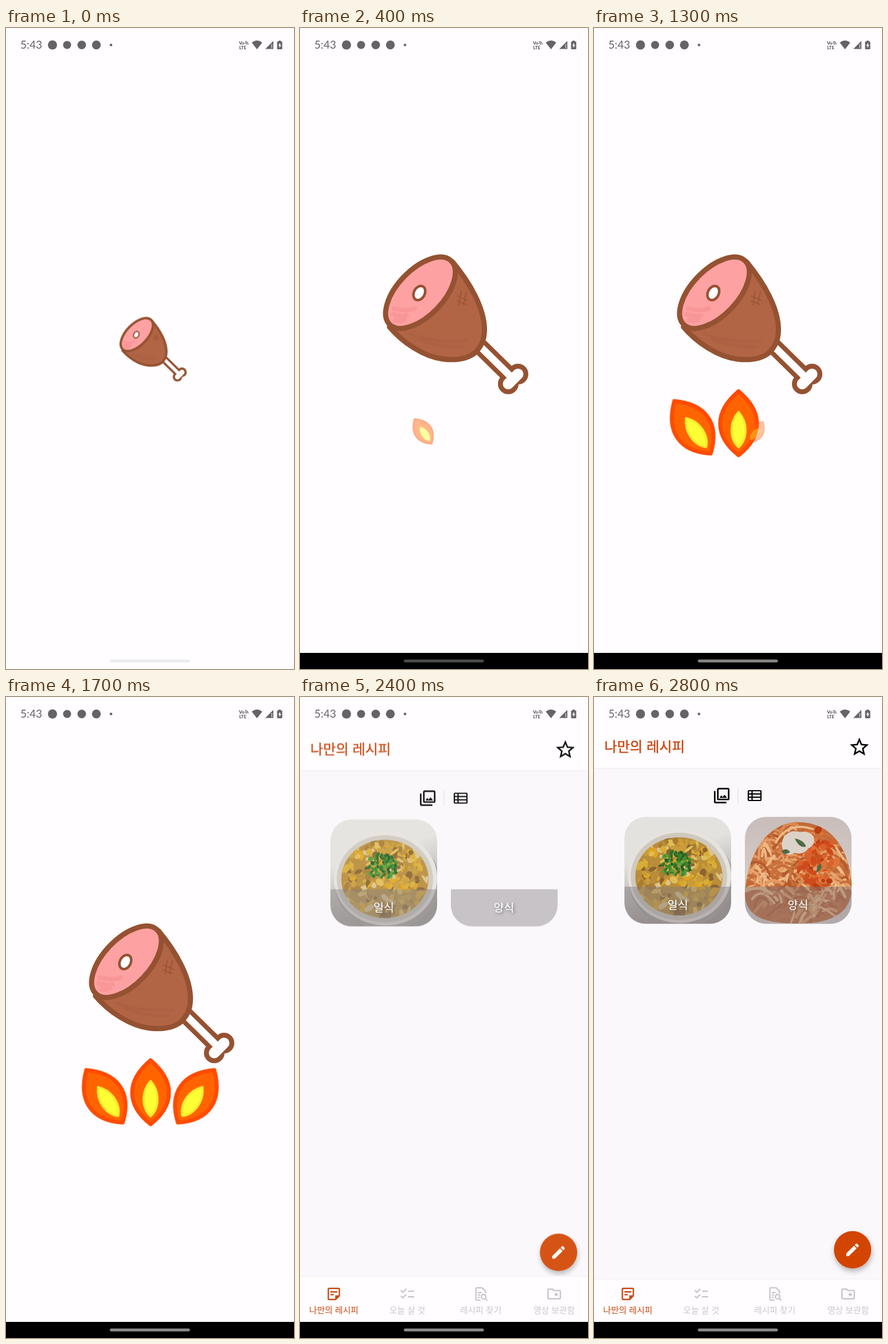
An HTML page that plays this animation: 502 px wide and 1115 px high, repeating every 3.6 s.

```html
<!DOCTYPE html>
<html lang="ko">
<head>
<meta charset="utf-8">
<title>Recipe app start</title>
<style>
html, body { margin: 0; width: 100%; height: 100%; overflow: hidden; background: #fffdff; }
svg { display: block; width: 100%; height: 100%; }
text { font-family: "Noto Sans CJK KR", "Noto Sans CJK", "Noto Sans", sans-serif; }
.status { fill: #666366; }
.status text { font-family: Lato, sans-serif; }
.mid { text-anchor: middle; }
.line { fill: none; stroke-linecap: round; stroke-linejoin: round; }

.splash, .scene, .bar, .pill, .home, .page, .tabs, .tabBack, .late, .flame {
  animation: 3.6s linear infinite both;
}
.splash { animation-name: splash; }
.scene { animation-name: scene; }
.bar { animation-name: bar; }
.pill { animation-name: pill; }
.home { animation-name: home; }
.page { animation-name: page; }
.tabs { animation-name: tabs; }
.tabBack { animation-name: tabBack; }
.late { animation-name: late; }
.flame { animation-name: grow; animation-delay: var(--at); transform-origin: 252px 708px; }

@keyframes splash { 0%, 2.2% { opacity: 1; } 5.3%, 100% { opacity: 0; } }
@keyframes scene { 0%, 2.2% { opacity: 0; } 5.3%, 54% { opacity: 1; } 58%, 100% { opacity: 0; } }
@keyframes bar { 0%, 2.2% { opacity: 0; } 5.3%, 100% { opacity: 1; } }
@keyframes pill {
  0%, 2.2% { fill: #ecebed; }
  5.3% { fill: #3c3c3c; }
  11.1% { fill: #4b4b4b; }
  25% { fill: #7b756f; }
  40%, 100% { fill: #8c8b8b; }
}
@keyframes home { 0%, 54% { opacity: 0; } 58%, 100% { opacity: 1; } }
@keyframes page {
  0%, 60.8% { opacity: 0; transform: translateY(45px); }
  63.9% { opacity: .7; transform: translateY(14px); }
  66.67% { opacity: .92; transform: translateY(4.5px); }
  70.8%, 100% { opacity: 1; transform: none; }
}
@keyframes tabs { 0%, 60.8% { opacity: 0; } 63.5%, 100% { opacity: 1; } }
@keyframes tabBack { 0%, 67% { transform: translateY(-5px); } 70.8%, 100% { transform: none; } }
@keyframes late { 0%, 69.2% { opacity: 0; } 69.3%, 100% { opacity: 1; } }
@keyframes grow {
  0% { transform: scale(0); opacity: 0; animation-timing-function: cubic-bezier(.4, 0, .2, 1); }
  12.8%, 60% { transform: none; opacity: 1; }
  60.1%, 100% { transform: scale(0); opacity: 0; }
}
</style>
</head>
<body>
<svg viewBox="0 0 502 1115" preserveAspectRatio="none">
  <defs>
    <linearGradient id="pink" x1=".6" y1="0" x2=".4" y2="1">
      <stop offset=".6" stop-color="#fea1a2"/><stop offset="1" stop-color="#f78f91"/>
    </linearGradient>
    <linearGradient id="table" x2=".3" y2="1">
      <stop offset=".4" stop-color="#e4e2df"/><stop offset="1" stop-color="#a29d98"/>
    </linearGradient>
    <linearGradient id="wall" x2="0" y2="1">
      <stop offset="0" stop-color="#c8bdb9"/><stop offset="1" stop-color="#ddd3d0"/>
    </linearGradient>
    <filter id="fabShadow" x="-40%" y="-40%" width="180%" height="180%">
      <feDropShadow dx="1" dy="5" stdDeviation="5" flood-color="#000" flood-opacity=".28"/>
    </filter>
    <filter id="textShadow" x="-40%" y="-40%" width="180%" height="180%">
      <feDropShadow dx="2" dy="2" stdDeviation="2.500" flood-color="#000" flood-opacity=".5"/>
    </filter>
    <clipPath id="leftCard"><rect x="53" y="208.500" width="186" height="186" rx="37"/></clipPath>
    <clipPath id="rightCard"><rect x="263" y="208.500" width="186" height="186" rx="37"/></clipPath>
    <clipPath id="food"><ellipse cx="148" cy="312" rx="76" ry="68"/></clipPath>
    <path id="moundShape" d="M263 345C266 275 300 222 350 218C412 215 444 262 449 325C452 372 420 394 356 394C300 394 266 384 263 345Z"/>
    <clipPath id="mound"><use href="#moundShape"/></clipPath>
    <clipPath id="body"><rect y="50" width="502" height="1037"/></clipPath>

    <g id="ham">
      <g fill="#955232">
        <path class="line" d="M314 554L363 602" stroke="#955232" stroke-width="28.500"/>
        <circle cx="380" cy="602" r="18"/>
        <circle cx="363" cy="619" r="18"/>
      </g>
      <g class="line" stroke="#fffdff">
        <path d="M314 554L368 607" stroke-width="12.500"/>
        <path d="M380 602L363 619" stroke-width="19"/>
      </g>
      <path d="M266 407C296 443 321.500 487 321.500 525C321.500 545 314 556 305 565C290 577 268 578 250 576C215 572 178 546 156 520Z"
        fill="#b16545" stroke="#955232" stroke-width="9" stroke-linejoin="round"/>
      <path class="line" d="M192 532Q235 548 290 544M205 540Q240 557 284 554" stroke="#a96041" stroke-width="5" opacity=".6"/>
      <path class="line" d="M281 458l-4 24M290 459l-5 22M274 466l18 8M274 475l16 6" stroke="#955232" stroke-width="1.800" opacity=".85"/>
      <ellipse cx="210" cy="460.500" rx="77" ry="40" transform="rotate(-46 210 460.500)"
        fill="#fea1a2" stroke="#955232" stroke-width="9"/>
      <path class="line" d="M164 488q20 6 36 0M162 498q14 5 24 2M166 508q8 3 16-1" stroke="#f58f91" stroke-width="8" opacity=".6"/>
      <ellipse cx="208" cy="461" rx="9.500" ry="13" transform="rotate(28 208 461)" fill="#fffdff" stroke="#955232" stroke-width="4.500"/>
    </g>

    <g id="flame">
      <path d="M0-56C19-40 32-21 32 0C32 23 18 41 0 55C-18 41-32 23-32 0C-32-21-19-40 0-56Z"
        fill="#ff6400" stroke="#ff4b00" stroke-width="7" stroke-linejoin="round"/>
      <path d="M0-20C8-11 12 1 12 11C12 23 8 34 0 41C-8 34-12 23-12 11C-12 1-8-11 0-20Z"
        fill="#ffff36" stroke="#f8ec2c" stroke-width="4" stroke-linejoin="round"/>
    </g>
  </defs>

  <rect width="502" height="1115" fill="#fffdff"/>

  <g class="splash">
    <use href="#ham" transform="translate(256 559) scale(.463) translate(-270.500 -516)"/>
  </g>

  <g class="scene">
    <use href="#ham"/>
    <g class="flame" style="--at:246ms"><use href="#flame" transform="translate(172 695) rotate(-34.800)"/></g>
    <g class="flame" style="--at:685ms"><use href="#flame" transform="translate(252 688)"/></g>
    <g class="flame" style="--at:1160ms"><use href="#flame" transform="translate(331 695) rotate(34.800)"/></g>
  </g>

  <g class="home" clip-path="url(#body)">
    <rect y="50" width="502" height="1037" fill="#faf8fb"/>
    <g class="page">
      <rect width="502" height="124" fill="#fffdff"/>
      <rect y="123.500" width="502" height="1" fill="#eae8eb"/>
      <text x="18" y="95" font-size="24.200" font-weight="500" fill="#c94208" stroke="#c94208" stroke-width=".4">나만의 레시피</text>
      <path transform="translate(442.700 67.200) scale(1.650)" fill="#000" d="M22 9.240l-7.190-.620L12 2 9.190 8.630 2 9.240l5.460 4.730L5.820 21 12 17.270 18.180 21l-1.630-7.030L22 9.240zM12 15.400l-3.760 2.270 1-4.280-3.320-2.880 4.380-.380L12 6.100l1.710 4.040 4.380.380-3.320 2.880 1 4.280L12 15.400z"/>
      <path transform="translate(206.400 155.300) scale(1.350)" d="M20 4v12H8V4h12m0-2H8c-1.100 0-2 .9-2 2v12c0 1.100.9 2 2 2h12c1.100 0 2-.9 2-2V4c0-1.100-.9-2-2-2zm-8.500 9.670l1.690 2.260 2.480-3.100L19 15H9zM2 6v14c0 1.100.9 2 2 2h14v-2H4V6H2z"/>
      <rect x="250.500" y="158" width="1" height="27" fill="#dedce0"/>
      <path class="line" d="M270 163h20q1 0 1 1v15q0 1-1 1h-20q-1 0-1-1v-15q0-1 1-1zM275.500 163v17M269 168.700h22M269 174.400h22" stroke="#000" stroke-width="2.200"/>

      <g clip-path="url(#leftCard)">
        <rect x="53" y="208" width="186" height="187" fill="url(#table)"/>
        <ellipse cx="152" cy="318" rx="92" ry="82" fill="#aaa49d"/>
        <ellipse cx="149" cy="311" rx="90" ry="82" fill="#e6e3de"/>
        <ellipse cx="148" cy="312" rx="84" ry="76" fill="#cfc9be"/>
        <g id="bowl" clip-path="url(#food)"><rect x="70" y="240" width="160" height="145" fill="#b98d3a"/></g>
        <g id="herbs"/>
        <rect x="53" y="330" width="186" height="65" fill="#807b7e" fill-opacity=".46"/>
      </g>
      <g clip-path="url(#rightCard)">
        <g class="late">
          <rect x="263" y="208" width="186" height="187" fill="url(#wall)"/>
          <use href="#moundShape" fill="#c26a38"/>
          <g id="pasta" clip-path="url(#mound)"/>
          <path d="M331 243q12-14 28-8q16-3 24 8q4 14-9 20q-9 13-24 8q-16 9-21-5q-4-12 2-23z" fill="#dcd2c7"/>
          <path d="M350 246q14 2 20 14q-12 4-20-14zM342 270q-6-8-14-3q0 10 14 3zM387 306q2-12 8-16q6 8-8 16z" fill="#4c6b45"/>
        </g>
        <rect x="263" y="330" width="186" height="65" fill="#807b7e" fill-opacity=".46"/>
      </g>
      <g class="mid" font-size="19.500" fill="#fff" filter="url(#textShadow)">
        <text x="146" y="369">일식</text>
        <text x="355.500" y="369">양식</text>
      </g>
      <circle cx="450.700" cy="961.500" r="32.500" fill="#d24403" filter="url(#fabShadow)"/>
      <path transform="translate(436 947) scale(1.220)" fill="#fff" d="M3 17.250V21h3.750L17.810 9.940l-3.750-3.750L3 17.250zM20.710 7.040c.39-.39.39-1.020 0-1.410l-2.340-2.340c-.39-.39-1.020-.39-1.410 0l-1.830 1.830 3.750 3.750 1.830-1.830z"/>
    </g>

    <g class="tabs">
      <g class="tabBack">
        <rect y="1012" width="502" height="85" fill="#f0eef1"/>
        <rect y="1013" width="502" height="85" fill="#fffdff"/>
      </g>
      <g fill="#c9c6ca" font-size="14.800" class="mid">
        <g fill="#c84a12">
          <path transform="translate(44.600 1024) scale(1.200)" d="M19 5v9h-5v5H5V5h14m0-2H5c-1.100 0-2 .9-2 2v14c0 1.100.9 2 2 2h10l6-6V5c0-1.100-.9-2-2-2zm-7 11H7v-2h5v2zm5-4H7V8h10v2z"/>
          <text x="59" y="1071.500" font-weight="500">나만의 레시피</text>
        </g>
        <path transform="translate(172.600 1024) scale(1.200)" d="M22 7h-9v2h9V7zm0 8h-9v2h9v-2zM5.540 11L2 7.460l1.410-1.410 2.120 2.120 4.240-4.240 1.410 1.410L5.540 11zm0 8L2 15.460l1.410-1.410 2.120 2.120 4.240-4.240 1.410 1.410L5.540 19z"/>
        <text x="187" y="1071.500">오늘 살 것</text>
        <path class="line" transform="translate(300.600 1024) scale(1.200)" stroke="#c9c6ca" stroke-width="1.900" d="M11 21H6a1 1 0 0 1-1-1V4a1 1 0 0 1 1-1h8l5 5v2.500M8.500 10h4M8.500 13.500h2M8.500 17h1.500M19.500 16a3.300 3.300 0 1 1-6.600 0a3.300 3.300 0 1 1 6.600 0M18.600 18.500L21 21"/>
        <text x="315" y="1071.500">레시피 찾기</text>
        <path transform="translate(428.600 1024) scale(1.200)" d="M20 6h-8l-2-2H4c-1.100 0-2 .9-2 2v12c0 1.100.9 2 2 2h16c1.100 0 2-.9 2-2V8c0-1.100-.9-2-2-2zm0 12H4V6h5.170l2 2H20v10zM15 9l1 2.400 2.600.2-2 1.700.6 2.500-2.200-1.400-2.200 1.400.6-2.500-2-1.700 2.600-.2z"/>
        <text x="443" y="1071.500">영상 보관함</text>
      </g>
    </g>
  </g>

  <g class="status">
    <text x="25" y="36.300" font-size="19" letter-spacing=".1">5:43</text>
    <circle cx="81" cy="29.500" r="8"/>
    <circle cx="106.500" cy="29.500" r="7"/>
    <circle cx="132" cy="29.500" r="7.500"/>
    <circle cx="157.500" cy="29.500" r="7.700"/>
    <circle cx="183" cy="29.500" r="2.300"/>
    <g font-size="8" font-weight="900">
      <text x="406" y="28.500">Vo</text>
      <text x="406.500" y="36.500" font-size="7.600">LTE</text>
    </g>
    <path class="line" d="M417 26q2 0 2.500 2.500M417 23.300q4.500 .5 5 5" stroke="#666366" stroke-width="1.300"/>
    <path d="M428.500 25.500Q437.500 18 446.500 25.500L437.500 37Z"/>
    <path d="M466 22.500V36.500H452Z"/>
    <path d="M463.300 28v7" stroke="#fffdff" stroke-width="1"/>
    <path d="M475 22h4v1.500h1.500q1 0 1 1v11.500q0 1-1 1h-7q-1 0-1-1v-11.500q0-1 1-1h1.500z"/>
    <path d="M477.800 25.500l-3.300 5.200h2v4l3.300-5.200h-2z" fill="#fffdff"/>
  </g>

  <rect class="bar" y="1087" width="502" height="28"/>
  <rect class="pill" x="181" y="1098.500" width="139.500" height="5" rx="2.500"/>
</svg>
<script>
let seed = 7;
const rand = (lo, hi) => {
  seed = (seed * 16807) % 2147483647;
  return lo + (hi - lo) * seed / 2147483647;
};
const pick = list => list[Math.floor(rand(0, list.length))];
const add = (id, tag, attrs) => {
  const el = document.createElementNS("http://www.w3.org/2000/svg", tag);
  for (const key in attrs) el.setAttribute(key, attrs[key]);
  document.getElementById(id).append(el);
};
// Random point inside an ellipse
const spot = (cx, cy, rx, ry) => {
  const a = rand(0, 2 * Math.PI), r = Math.sqrt(rand(0, 1));
  return [cx + rx * r * Math.cos(a), cy + ry * r * Math.sin(a)];
};
const blob = (id, [x, y], rx, ry, fill) => add(id, "ellipse", {
  rx, ry, fill, transform: `translate(${x} ${y}) rotate(${rand(0, 180)})`
});
const strand = ([x, y], colors) => {
  const w = rand(-34, 34), h = rand(-18, 18);
  add("pasta", "path", {
    class: "line", stroke: pick(colors), "stroke-width": rand(3, 5.5),
    d: `M${x - w} ${y - h}Q${x + h} ${y - 26} ${x + w} ${y + h}`
  });
};

for (let i = 0; i < 190; i++)
  blob("bowl", spot(148, 312, 76, 68), rand(3, 10), rand(2, 6),
    pick(["#d9ad35", "#e0bd55", "#a97c34", "#8a6430", "#c99c3a", "#d9c48a", "#dfa51f"]));
for (let i = 0; i < 100; i++)
  blob("herbs", spot(142, 291, 29, 22), rand(2, 4.5), rand(1.5, 3),
    pick(["#2f6e25", "#3f8a2f", "#56a038", "#285c22"]));
for (let i = 0; i < 170; i++)
  strand(spot(356, 315, 92, 82), ["#e5a56e", "#d98a50", "#edb986", "#c9703c", "#e39a62", "#b45a2e"]);
for (let i = 0; i < 90; i++)
  blob("pasta", spot(390, 283, 34, 52), rand(3, 11), rand(2, 6),
    pick(["#cf4a1c", "#d9612c", "#b93d14", "#de7438", "#c9531f"]));
</script>
</body>
</html>
```
